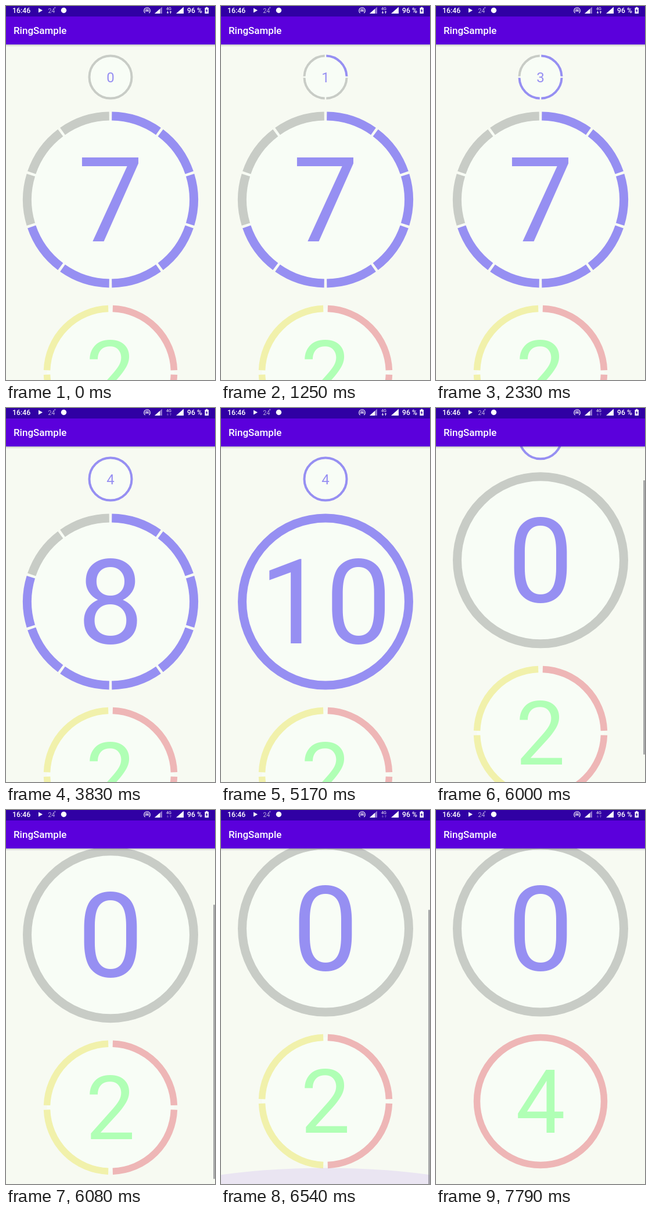
These frames come from a looping animation (360 px wide and 642 px high, 8 s). An HTML page with a canvas:

```html
<!DOCTYPE html>
<html lang="en">
<head>
<meta charset="utf-8">
<title>Ring counters</title>
<style>
  html, body { margin: 0; width: 100%; height: 100%; overflow: hidden; background: #f7faf2; }
  canvas { display: block; width: 360px; height: 642px; }
</style>
</head>
<body>
<canvas id="stage" width="360" height="642"></canvas>
<script>
const ctx = document.getElementById('stage').getContext('2d');
const W = 360, H = 642, LOOP = 8000, TOP = 66, MAX_SCROLL = 129;
const PURPLE = '#968ff2', GRAY = '#c8ccc6';

// `taps` are the times at which a counter advances; it wraps after `max`.
const rings = [
  { y: 122, r: 36.5, line: 4, max: 4, first: 0, taps: [1170, 1580, 2040, 2580],
    size: 24, on: PURPLE, off: GRAY, ink: PURPLE },
  { y: 332.5, r: 143.5, line: 15, max: 10, first: 7, taps: [3830, 4320, 4800, 5290],
    size: 202, on: PURPLE, off: GRAY, ink: PURPLE },
  { y: 629, r: 109.5, line: 11.5, max: 4, first: 2, taps: [7250, 7670],
    size: 152, on: '#eeb6b6', off: '#f1f1ab', ink: '#b0ffb5' }
];

const scrollKeys = [[5880, 0], [5920, 12], [5960, 40], [6000, 70.5], [6040, 98], [6080, 118], [6120, MAX_SCROLL]];

const clamp = x => Math.max(0, Math.min(1, x));
const progress = (t, from, to) => clamp((t - from) / (to - from));

function keyed(keys, t) {
  let value = keys[0][1];
  for (let i = 1; i < keys.length; i++) {
    const [t0, a] = keys[i - 1], [t1, b] = keys[i];
    if (t >= t0) value = a + (b - a) * progress(t, t0, t1);
  }
  return value;
}

function text(str, x, y, size, weight = 400, color = '#fff', align = 'left') {
  ctx.font = `${weight} ${size}px Roboto, sans-serif`;
  ctx.textAlign = align;
  ctx.fillStyle = color;
  ctx.fillText(str, x, y);
}

function polygon(points, color) {
  ctx.beginPath();
  points.forEach(([x, y]) => ctx.lineTo(x, y));
  ctx.fillStyle = color;
  ctx.fill();
}

function disc(x, y, r, color) {
  ctx.beginPath();
  ctx.arc(x, y, r, 0, 2 * Math.PI);
  ctx.fillStyle = color;
  ctx.fill();
}

function arc(x, y, r, from, to, line, color) {
  ctx.beginPath();
  ctx.arc(x, y, r, from, to);
  ctx.lineWidth = line;
  ctx.strokeStyle = color;
  ctx.stroke();
}

function drawRing(ring, t, scroll) {
  const { r, line, max, size } = ring;
  const y = ring.y - scroll;
  const value = (ring.first + ring.taps.filter(tap => t >= tap).length) % (max + 1);
  disc(180, y, r, '#f8fdf6');
  if (value === 0 || value === max) {
    arc(180, y, r, 0, 2 * Math.PI, line, value ? ring.on : ring.off);
  } else {
    const step = 2 * Math.PI / max;
    const gap = (max === 4 ? 4 : 1.8) * Math.PI / 180;
    for (let i = 0; i < max; i++) {
      const start = i * step - Math.PI / 2;
      arc(180, y, r, start + gap / 2, start + step - gap / 2, line, i < value ? ring.on : ring.off);
    }
  }
  text(value, 180, y + size * 0.3555, size, 400, ring.ink, 'center');
}

function drawGlow(t) {
  if (t < 6100 || t > 6740) return;
  const level = progress(t, 6100, 6250) * (1 - progress(t, 6250, 6740));
  const height = 68 * level, ry = 540 * height / 72;
  ctx.beginPath();
  ctx.ellipse(180, H - height + ry, 540, ry, 0, 0, 2 * Math.PI);
  ctx.fillStyle = `rgba(98, 0, 238, ${0.21 * level})`;
  ctx.fill();
}

function drawScrollbar(t, scroll) {
  if (t < 5880) return;
  const view = H - TOP, scale = view / (view + MAX_SCROLL);
  ctx.fillStyle = `rgba(110, 110, 114, ${0.56 * (1 - progress(t, 6700, 6950))})`;
  ctx.fillRect(357, TOP + scroll * scale, 3, view * scale);
}

function drawStatusBar(t) {
  ctx.fillStyle = '#3000a4';
  ctx.fillRect(0, 0, W, 18);
  text('16:46', 11, 12.3, 12.3, 500);
  polygon([[56, 3.5], [63, 7.5], [56, 11.5]], '#fff');
  text('24', 72.5, 12, 10.5, 300);
  arc(84.3, 3, 0.9, 0, 2 * Math.PI, 0.6, '#ddd0ff');
  disc(99.5, 7.5, 4.7, '#fff');

  disc(243, 8, 1.5, '#fff');
  arc(243, 8, 3, Math.PI * 0.78, Math.PI * 2.22, 1, '#fff');
  arc(243, 8, 5.3, Math.PI * 0.72, Math.PI * 2.28, 1.1, '#fff');

  polygon([[256, 13], [269, 13], [269, 1.5]], '#8f74cf');
  polygon([[256, 13], [265, 13], [265, 5]], '#fff');
  text('4G', 276, 7, 7.2, 400);
  const active = t < 3580 || (t >= 4800 && t < 5580);
  const arrowColor = active ? '#fff' : '#7654c4';
  const arrow = (x, tip, tail) => {
    const neck = tip + Math.sign(tail - tip) * 2;
    polygon([[x, tip], [x + 2, neck], [x - 2, neck]], arrowColor);
    ctx.fillRect(x - 0.5, Math.min(neck, tail), 1, Math.abs(tail - neck));
  };
  arrow(278.5, 13, 8.5);
  arrow(283.5, 8.5, 13);
  polygon([[293, 13], [306, 13], [306, 1.5]], '#fff');

  text('96 %', 312, 12.3, 12.2, 500);
  ctx.fillStyle = '#fff';
  ctx.fillRect(342.5, 3, 6.5, 10);
  ctx.fillRect(344.3, 1.8, 3, 1.5);
  polygon([[346.4, 4.3], [343.8, 8.5], [345.4, 8.5], [345, 11.8], [347.7, 7.4], [346.1, 7.4]], '#3000a4');
}

function drawToolbar() {
  const shade = ctx.createLinearGradient(0, TOP, 0, TOP + 4);
  shade.addColorStop(0, 'rgba(40, 40, 60, 0.24)');
  shade.addColorStop(1, 'rgba(40, 40, 60, 0)');
  ctx.fillStyle = shade;
  ctx.fillRect(0, TOP, W, 4);
  ctx.fillStyle = '#5b00dc';
  ctx.fillRect(0, 18, W, TOP - 18);
  text('RingSample', 13, 48, 17, 500);
}

function draw(now) {
  const t = now % LOOP;
  const scroll = keyed(scrollKeys, t);
  ctx.fillStyle = '#f7faf2';
  ctx.fillRect(0, 0, W, H);
  rings.forEach(ring => drawRing(ring, t, scroll));
  drawGlow(t);
  drawScrollbar(t, scroll);
  drawToolbar();
  drawStatusBar(t);
  requestAnimationFrame(draw);
}
requestAnimationFrame(draw);
</script>
</body>
</html>
```
